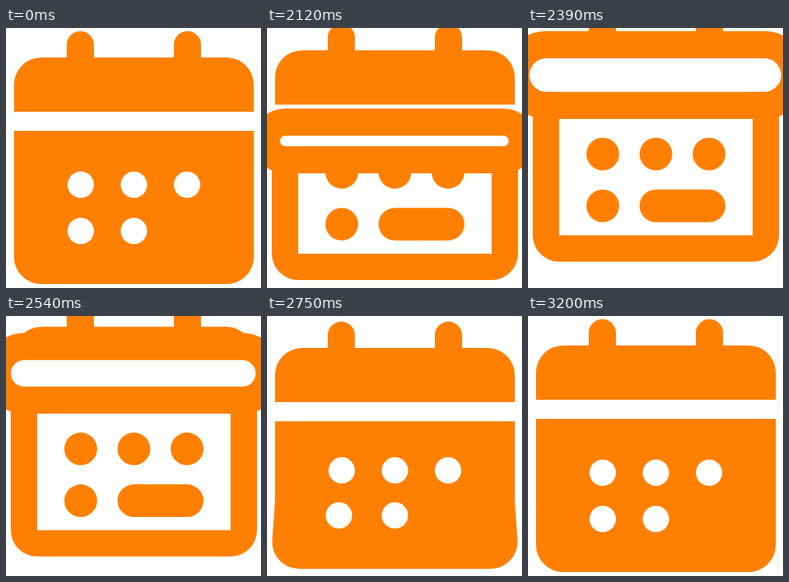
These frames come from a looping animation (319 by 326 pixels, 3230 ms). An HTML page with a canvas:

```html
<!DOCTYPE html>
<html lang="en">
<head>
<meta charset="utf-8">
<title>Calendar</title>
<style>
html, body { margin: 0; width: 100%; height: 100%; overflow: hidden; background: #fff; }
canvas { display: block; }
</style>
</head>
<body>
<canvas id="stage" width="319" height="326"></canvas>
<script>
const ctx = document.getElementById('stage').getContext('2d');
const W = 319, H = 326, LOOP = 3230, APEX = 2390, FOLD_SPAN = 360;
const ORANGE = '#ff8000', WHITE = '#fff';
const COLS = [93.5, 160, 226.5];

// Keys are [time, value] pairs; the fold is keyed by distance from the apex.
const LIFT = [[2030, 0], [2120, -9], [2240, -24], [2390, -32], [2540, -23.5], [2660, -9],
  [2750, 3], [2930, 18], [3020, 12], [3110, 3], [3200, 0]];
const SWING = [[2700, 0], [2750, -1], [2840, 0], [2930, 1], [3030, 0], [3110, -1], [3200, 0]];
const FOLD_Y = [[0, 59], [150, 71.8], [270, 142.5], [360, 275]];
const FOLD_HALF = [[0, 38], [150, 33.7], [270, 23.5], [360, 1]];

// Smooth interpolation that rests at extremes and at both ends.
function track(keys, t) {
  const last = keys.length - 1;
  if (t <= keys[0][0]) return keys[0][1];
  if (t >= keys[last][0]) return keys[last][1];
  const slope = i => (keys[i + 1][1] - keys[i][1]) / (keys[i + 1][0] - keys[i][0]);
  const tangent = i => {
    if (i === 0) return 0;
    if (i === last) return keys === LIFT || keys === SWING ? 0 : slope(i - 1);
    const a = slope(i - 1), b = slope(i);
    return a * b <= 0 ? 0 : 2 * a * b / (a + b);
  };
  const i = keys.findIndex(k => k[0] > t) - 1;
  const [t0, v0] = keys[i], [t1, v1] = keys[i + 1];
  const d = t1 - t0, p = (t - t0) / d, q = 1 - p;
  return v0 * q * q * (1 + 2 * p) + v1 * p * p * (3 - 2 * p)
    + d * p * q * (tangent(i) * q - tangent(i + 1) * p);
}

function box(x, y, w, h, radii, color) {
  ctx.fillStyle = color;
  ctx.beginPath();
  ctx.roundRect(x, y, w, h, radii);
  ctx.fill();
}

const pill = (x1, x2, y, r, color) => box(x1 - r, y - r, x2 - x1 + 2 * r, 2 * r, r, color);

function clipped(top, bottom, draw) {
  ctx.save();
  ctx.beginPath();
  ctx.rect(0, top, W, bottom - top);
  ctx.clip();
  draw();
  ctx.restore();
}

function drawHeader(lift) {
  for (const x of [76, 210]) box(x, 4 + lift, 34, 50, [17, 17, 0, 0], ORANGE);
  box(10, 37 + lift, 300, 68, [34, 34, 0, 0], ORANGE);
}

function drawPage(lift, swing) {
  const top = 129 + lift, bend = top + 100, tilt = Math.abs(swing);
  const bottom = 321 + lift - 7 * tilt, inset = 6 * swing;
  ctx.fillStyle = ORANGE;
  ctx.beginPath();
  ctx.moveTo(10, top);
  ctx.lineTo(310, top);
  ctx.lineTo(310, bend);
  ctx.arcTo(310 - inset, bottom, 160, bottom, 34);
  ctx.arcTo(10 + inset, bottom, 10, bend, 34);
  ctx.lineTo(10, bend);
  ctx.fill();
  for (const x of COLS) pill(x, x, 196.5 + lift - 6 * tilt, 16.5, WHITE);
  for (const x of COLS.slice(0, 2)) {
    const cx = x + (160 - x) * 0.053 * swing;
    pill(cx, cx, 254.5 + lift - 7.5 * tilt, 16.5, WHITE);
  }
}

function drawFrame(lift, grow) {
  const bottom = 321 + grow + lift;
  box(10 - grow, 80 + lift, 300 + 2 * grow, bottom - 80 - lift, 33, ORANGE);
  box(43 - grow, 122 + lift, 234 + 2 * grow, bottom - 155 - lift, 0, WHITE);
  for (const x of COLS) pill(x, x, 190 + lift, 20.5, ORANGE);
  pill(COLS[0], COLS[0], 255 + lift, 20.5, ORANGE);
  pill(COLS[1], COLS[2], 255 + lift, 20.5, ORANGE);
}

function drawFold(y, half) {
  pill(22.8, 295.7, y, half + 17, ORANGE);
  if (half > 17) pill(22.8, 295.7, y, half - 17, WHITE);
}

function draw(t) {
  const lift = track(LIFT, t), swing = track(SWING, t);
  const away = Math.abs(t - APEX);
  ctx.fillStyle = WHITE;
  ctx.fillRect(0, 0, W, H);
  drawHeader(lift);
  if (away > FOLD_SPAN) return drawPage(lift, swing);

  const y = track(FOLD_Y, away);
  const grow = Math.min(4, 2 + (FOLD_SPAN - away) / 15);
  clipped(0, y, () => drawPage(lift, swing));
  clipped(y, H, () => drawFrame(lift, grow));
  drawFold(y, track(FOLD_HALF, away));
}

function tick() {
  draw(performance.now() % LOOP);
  requestAnimationFrame(tick);
}
tick();
</script>
</body>
</html>
```
